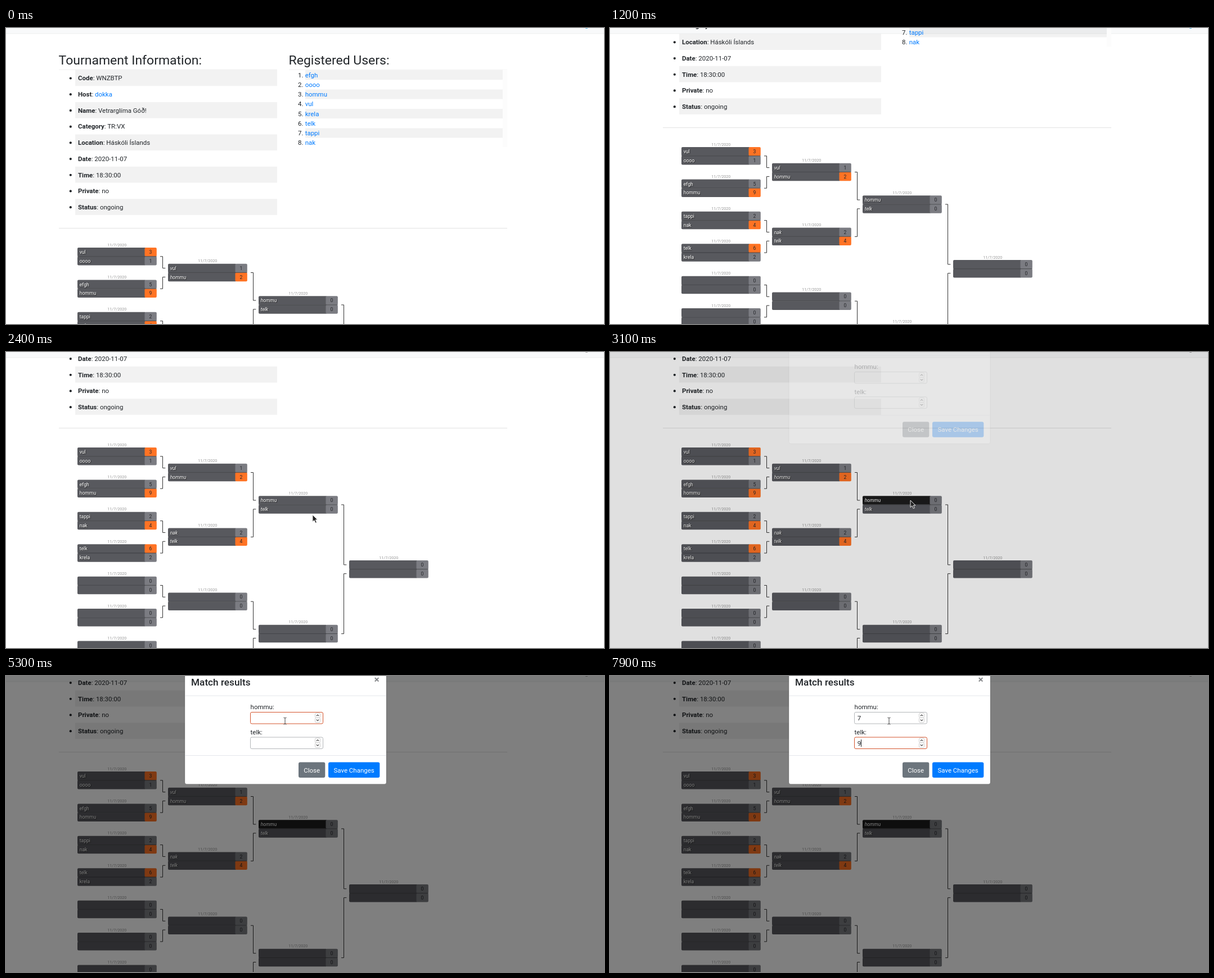
Recreate the animation shown at these times as an HTML page. Size 1063 by 527 pixels, loop 8000 ms.

```html
<!DOCTYPE html>
<html lang="is">
<head>
<meta charset="utf-8">
<title>Tournament bracket</title>
<style>
html, body { margin: 0; width: 100%; height: 100%; overflow: hidden; background: #fff; }
svg { display: block; font: 11.48px Roboto, sans-serif; fill: #212529; }
.h2 { font-size: 22.97px; }
.title { font-size: 17.22px; font-weight: 500; }
.b { font-weight: 700; }
.link { fill: #007bff; }
.date { font-size: 7.18px; fill: #999; text-anchor: middle; }
.name { font-size: 8.61px; fill: #fff; text-shadow: 1px 1px 1px #222; }
.score { font-size: 8.61px; fill: #26272b; text-anchor: middle; }
.wire { fill: none; stroke: #333; }
.btn { fill: #fff; text-anchor: middle; }
.field { fill: #fff; stroke: #b4b7ba; }
.focus { stroke: #d4542c; }
.spin { fill: #fff; stroke: #bbb; stroke-width: .7; }
.chev { fill: none; stroke: #333; stroke-width: 1.1; }
</style>
</head>
<body>
<svg width="1063" height="527" viewBox="0 0 1063 527">
  <rect width="1063" height="10" fill="#f8f9fa"/>
  <rect y="9.5" width="1063" height="1" fill="#eeefef"/>
  <circle id="icon" cx="1032" cy="-2" r="3"/>
  <g id="page"></g>
  <rect id="shade" width="1063" height="527" fill="#000"/>
  <g id="modal"></g>
  <path id="arrow" d="M0 0V12.5L3 9.8 5.2 14.6 7.4 13.6 5.2 9H9Z" fill="#222" stroke="#fff" stroke-width=".9"/>
  <path id="beam" d="M-2.5 -6Q0 -6 0 -4.5Q0 -6 2.5 -6M0 -4.5V4.5M-2.5 6Q0 6 0 4.5Q0 6 2.5 6" fill="none" stroke="#444"/>
</svg>
<script>
const $ = id => document.getElementById(id);
const rect = (x, y, w, h, attrs = '') => `<rect x="${x}" y="${y}" width="${w}" height="${h}" ${attrs}/>`;
const text = (x, y, s, cls = '', attrs = '') => `<text x="${x}" y="${y}" class="${cls}" ${attrs}>${s}</text>`;
const STRIPE = 'fill="#000" fill-opacity=".05"';

const info = {
  Code: 'WNZBTP', Host: '<tspan class="link">dokka</tspan>', Name: 'Vetrarglíma Góð!',
  Category: 'TR:VX', Location: 'Háskóli Íslands', Date: '2020-11-07',
  Time: '18:30:00', Private: 'no', Status: 'ongoing'
};
const users = ['efgh', 'oooo', 'hommu', 'vul', 'krela', 'telk', 'tappi', 'nak'];
// Per round: [name, score, name, score]; unlisted matches are empty.
const rounds = [
  [['vul', 3, 'oooo', 1], ['efgh', 5, 'hommu', 9], ['tappi', 2, 'nak', 4], ['telk', 6, 'krela', 2]],
  [['vul', 1, 'hommu', 2], ['nak', 2, 'telk', 4]],
  [['hommu', 0, 'telk', 0]],
  []
];

function infoList() {
  return Object.entries(info).map(([key, value], i) => {
    const y = 74.5 + i * 28.71;
    return (i % 2 ? '' : rect(123, y, 359, 28.7, STRIPE)) +
      `<circle cx="114.8" cy="${y + 15}" r="2.1"/>` +
      text(128, y + 18.8, `<tspan class="b">${key}</tspan>: ${value}`);
  }).join('');
}

function userList() {
  return users.map((name, i) => {
    const y = 75 + i * 17.22;
    return (i % 2 ? '' : rect(532, y, 351, 17.2, STRIPE)) +
      text(519, y + 12.7, i + 1 + '.') + text(531.7, y + 12.7, name, 'link');
  }).join('');
}

function match(round, i) {
  const [a, sa, b, sb] = rounds[round][i] || ['', 0, '', 0];
  const x = 127 + 161 * round;
  const step = 57.42 * 2 ** round;
  const y = 391 + step / 2 - 28.71 + i * step;
  const style = round ? 'font-style="italic"' : '';
  const row = (name, score, won, top, id) =>
    rect(x, top, 122, 15.7, `rx="2" fill="#58595e" ${id}`) +
    rect(x + 119.5, top, 21.3, 15.7, `rx="2" fill="${won ? '#ff7324' : '#7b7c82'}"`) +
    text(x + 3.7, top + 11.1, name, 'name', style) +
    text(x + 130, top + 11.1, score, 'score');
  let out = text(x + 70.3, y - 2.4, '11/7/2020', 'date') +
    row(a, sa, sa > sb, y, round == 2 && !i ? 'id="hover"' : '') +
    row(b, sb, sb > sa, y + 15.8, '') +
    `<path d="M${x} ${y + 15.7}h140.8" stroke="#35363a" stroke-width=".8"/>`;
  if (round < 3) {
    const drop = i % 2 ? 7.9 - step / 2 : step / 2 - 7.9;
    out += `<path class="wire" d="M${x + 147} ${y + 15.8}h4.5v${drop}h4.8"/>`;
  }
  return out;
}

function field(id, label, y) {
  const spin = (top, d) => rect(549.5, top, 9, 8.4, 'rx="2" class="spin"') +
    `<path class="chev" d="M551.7 ${top + 4.2 + d}l2.3 ${-2 * d}l2.3 ${2 * d}"/>`;
  return text(434.6, y - 4.7, label) +
    rect(434.5, y + .5, 129, 20.5, `rx="2.5" class="field" id="${id}"`) +
    spin(y + 2, 1) + spin(y + 10.4, -1) +
    text(439.7, y + 15, '', '', `id="${id}Value"`) +
    rect(440, y + 4.5, 1, 13, `id="${id}Caret"`);
}

$('page').innerHTML =
  text(93.6, 64.7, 'Tournament Information:', 'h2') + text(502.6, 64.7, 'Registered Users:', 'h2') +
  rect(94, 73.7, 388, .8, 'fill="#eee"') + rect(503, 73.7, 388, .8, 'fill="#eee"') +
  rect(883, 74, 8, 138, 'fill="#fcfcfc"') +
  infoList() + userList() + rect(94, 356, 797, 1, 'fill="#e2e2e2"') +
  rounds.map((_, r) => Array.from({ length: 8 >> r }, (_, i) => match(r, i)).join('')).join('');

$('modal').innerHTML =
  rect(318, -20, 358, 212.5, 'rx="3.5" fill="#fff" stroke="#000" stroke-opacity=".2" stroke-width=".8"') +
  text(329, 16.6, 'Match results', 'title') +
  text(659, 12, '×', 'title b', 'text-anchor="middle" fill-opacity=".55"') +
  rect(318, 34.7, 358, .8, 'fill="#dee2e6"') + rect(318, 141.2, 358, .8, 'fill="#dee2e6"') +
  field('first', 'hommu:', 64) + field('second', 'telk:', 108.5) +
  rect(520, 153.5, 47.3, 27.5, 'rx="3" fill="#6c757d"') + text(543.6, 171.6, 'Close', 'btn') +
  rect(573, 153.5, 91.3, 27.5, 'rx="3" fill="#007bff"') + text(618.6, 171.6, 'Save Changes', 'btn');

const progress = (t, start, end) => Math.min(1, Math.max(0, (t - start) / (end - start)));
const easeInOut = p => p < .5 ? 2 * p * p : 1 - 2 * (1 - p) ** 2;
const easeOut = p => 1 - (1 - p) ** 2;
const show = (id, on) => $(id).setAttribute('visibility', on ? 'visible' : 'hidden');
const move = (id, x, y) => $(id).setAttribute('transform', `translate(${x} ${y})`);

// Pointer path: [time, x, y]
const path = [[1700, 745, 527], [2400, 545, 290], [2600, 534, 264], [3700, 534, 264], [4000, 496, 80]];
function pointer(t) {
  let [, x, y] = path[0];
  for (let i = 1; i < path.length; i++) {
    const p = progress(t, path[i - 1][0], path[i][0]);
    x += (path[i][1] - path[i - 1][1]) * p;
    y += (path[i][2] - path[i - 1][2]) * p;
  }
  return [x, y];
}

function input(id, t, focusAt, typeAt, blurAt, digit) {
  const focused = t >= focusAt && t < blurAt;
  const typed = t >= typeAt;
  const since = t - (typed ? typeAt : focusAt);
  $(id).setAttribute('class', focused ? 'field focus' : 'field');
  $(id + 'Value').textContent = typed ? digit : '';
  $(id + 'Caret').setAttribute('x', typed ? 446 : 439.5);
  show(id + 'Caret', focused && since % 1000 < 500);
}

function draw(t) {
  move('page', 0, -Math.round(221 * easeInOut(progress(t, 100, 1690))));
  $('icon').setAttribute('fill', t < 1900 ? '#39a9e0' : '#999');

  const [x, y] = pointer(t);
  const typing = y < 86;
  move('arrow', x, y);
  move('beam', x, y);
  show('arrow', t >= 1700 && !typing);
  show('beam', typing);
  $('hover').setAttribute('fill', t >= 2550 ? '#1c1c1c' : '#58595e');

  const fade = progress(t, 3064, 3214);
  $('shade').setAttribute('opacity', fade / 2);
  $('modal').setAttribute('opacity', fade);
  move('modal', 0, -50 * (1 - easeOut(progress(t, 3030, 3330))));

  input('first', t, 4700, 6100, 7000, '7');
  input('second', t, 7000, 7500, 8000, '9');
}

const start = performance.now();
function tick() {
  draw((performance.now() - start) % 8000);
  requestAnimationFrame(tick);
}
tick();
</script>
</body>
</html>
```
